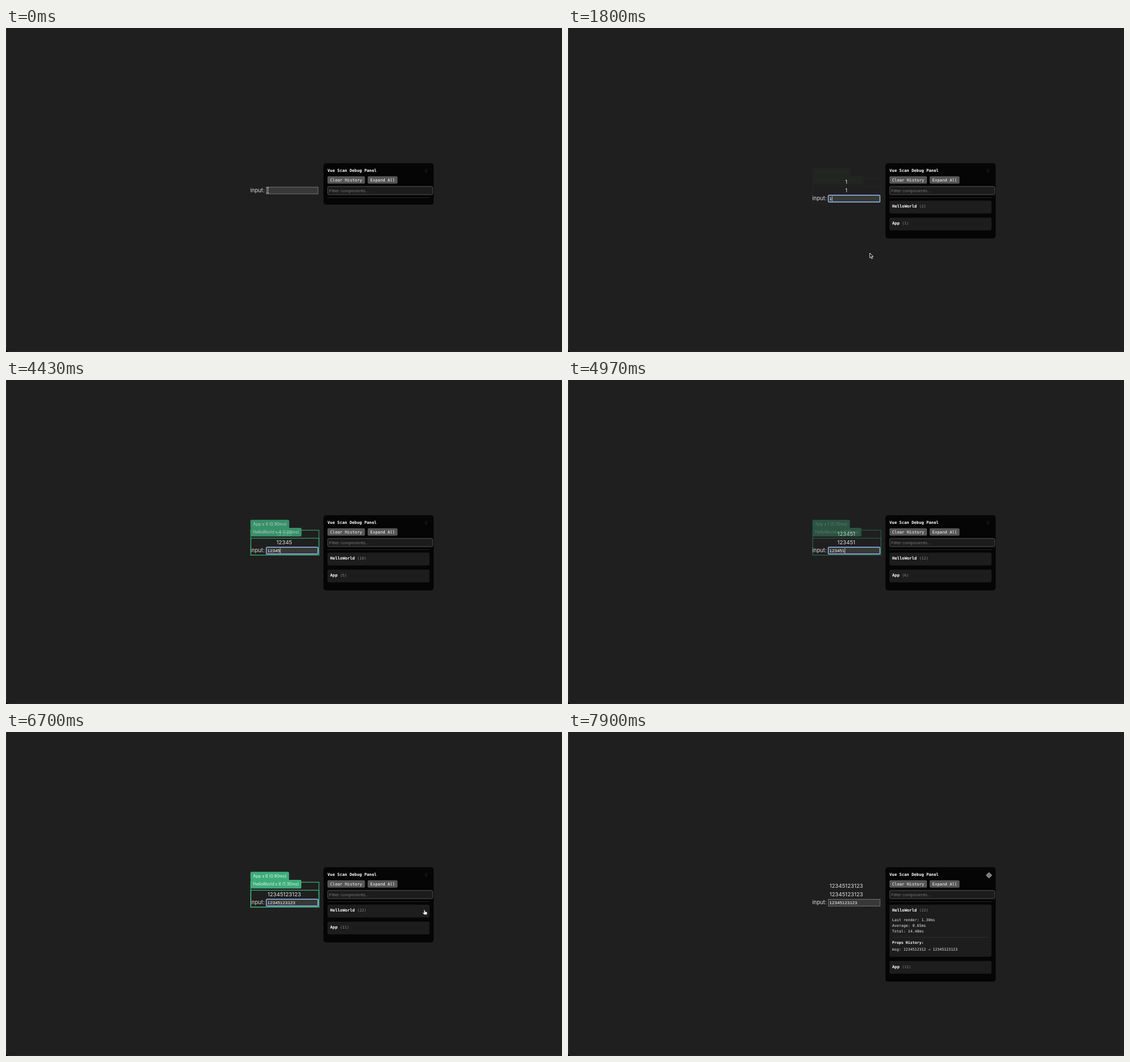
An HTML page for the animation above (8 s loop, 979 px wide and 572 px high).

```html
<!DOCTYPE html>
<html lang="en">
<head>
<meta charset="utf-8">
<title>Debug panel demo</title>
<style>
  html, body { margin: 0; width: 100%; height: 100%; overflow: hidden; background: #000; }
  svg { display: block; width: 100%; height: 100%; }
  text { white-space: pre; fill: #fff; }
  .body { font: 9.6px Inter, sans-serif; fill: #dedede; }
  .tag { font: 7.2px Inter, sans-serif; fill: #e6f5ee; }
  .field { font: 8px "Liberation Sans", sans-serif; }
  .mono { font: 7.2px "DejaVu Sans Mono", monospace; }
  .small { font: 6.6px "DejaVu Sans Mono", monospace; fill: #e8e8e8; }
  .bold { font-weight: bold; fill: #fff; }
  .dim { fill: #8c8c8c; }
</style>
</head>
<body>
<svg id="stage" viewBox="0 0 979 572"></svg>
<script>
const LOOP = 8000;
const FOCUS = 100, CLICK = 6870;
const TYPED = '12345123123';
const KEYS = [570, 1930, 2230, 2930, 3430, 4900, 5130, 5400, 5600, 5730, 5870];

// Bursts of renders: index of the first key, when the labels begin to fade out
const BURSTS = [
  { first: 0, out: 1575 },
  { first: 1, out: 4385 },
  { first: 5, out: 6870 }
];
// App and HelloWorld render times after each key
const APP_MS = [2.2, 0.8, 0.7, 0.9, 0.9, 0.7, 0.6, 0.7, 0.6, 0.7, 0.8];
const HELLO_MS = [3.6, 1.2, 1.1, 1.3, 1, 1.1, 0.9, 1, 0.8, 1, 1.3];

const stage = document.getElementById('stage');

function add(parent, name, attrs = {}, content) {
  const el = document.createElementNS('http://www.w3.org/2000/svg', name);
  set(el, attrs);
  if (content !== undefined) el.textContent = content;
  return parent.appendChild(el);
}
function set(el, attrs) {
  for (const k in attrs) el.setAttribute(k, attrs[k]);
}
function show(el, on) {
  el.style.display = on ? '' : 'none';
}
const group = (parent) => add(parent, 'g');
const rect = (parent, x, y, width, height, attrs) =>
  add(parent, 'rect', { x, y, width, height, ...attrs });
const label = (parent, cls, x, y, content = '') =>
  add(parent, 'text', { class: cls, x, y }, content);
const rule = (parent, x, y, width) =>
  rect(parent, x, y, width, 0.7, { fill: '#343434' });

// CSS "ease" curve
function ease(x) {
  x = Math.min(1, Math.max(0, x));
  let lo = 0, hi = 1;
  for (let i = 0; i < 20; i++) {
    const m = (lo + hi) / 2;
    if (0.75 * m * (1 - m) + m ** 3 < x) lo = m; else hi = m;
  }
  return 0.3 * lo * (1 - lo) ** 2 + 3 * lo * lo * (1 - lo) + lo ** 3;
}

// Window
rect(stage, 0.5, -20, 990, 591.3, { rx: 5, fill: '#1f1f1f', stroke: '#3a3a3a', 'stroke-width': 0.8 });

// Page
const rows = [275, 289.6].map(y => {
  const el = label(stage, 'body', 490, y);
  el.setAttribute('text-anchor', 'middle');
  return el;
});
const form = group(stage);
label(form, 'body', 430, 289.5, 'input:');
const box = rect(form, 458.3, 280.9, 91, 12, { fill: '#383838' });
const value = label(form, 'field', 460.3, 289.8);
const caret = rect(form, 0, 282.6, 0.7, 8.8, { fill: '#fff' });

// Render highlights
const marks = group(stage);
[[265.2, 44], [279.4, 29.8]].forEach(([y, h]) =>
  rect(marks, 431, y, 120, h, { fill: 'none', stroke: '#3fb27f', 'stroke-width': 1.2 }));
const tags = [246.7, 261].map(y => ({
  back: rect(marks, 430.4, y, 60, 15.2, { rx: 2.2, fill: '#3dac7a' }),
  text: label(marks, 'tag', 435.1, y + 10.1)
}));

function setTag(tag, content) {
  if (tag.text.textContent === content) return;
  tag.text.textContent = content;
  tag.back.setAttribute('width', tag.text.getComputedTextLength() + 9.2);
}

// Panel
const panel = rect(stage, 559, 238.8, 194, 73, { rx: 4.5, fill: '#050505' });
label(stage, 'mono bold', 566, 253.8, 'Vue Scan Debug Panel');
[249.7, 252.1, 254.5].forEach(cy => [738.3, 741].forEach(cx =>
  add(stage, 'circle', { cx, cy, r: 0.5, fill: '#555' })));
[[566, 66, 'Clear History'], [636.8, 52.6, 'Expand All']].forEach(([x, w, s]) => {
  rect(stage, x, 261.8, w, 13, { rx: 2, fill: '#565656' });
  label(stage, 'mono', x + 4.8, 270.7, s);
});
rect(stage, 566.4, 279.8, 185, 14.4, { rx: 2, fill: '#1c1c1c', stroke: '#5a5a5a', 'stroke-width': 0.9 });
label(stage, 'field', 569, 289.9, 'Filter components...').style.fill = '#757575';
rule(stage, 566, 299.2, 179.6);

function makeCard(name) {
  const g = group(stage);
  const back = rect(g, 566, 0, 179.7, 22.6, { rx: 2.3, fill: '#1d1d1d' });
  label(g, 'mono bold', 570.8, 12.5, name);
  const count = label(g, 'small dim', 570.8 + 4.334 * (name.length + 1), 12.5);
  return { g, back, count };
}
const hello = makeCard('HelloWorld');
const app = makeCard('App');
hello.g.setAttribute('transform', 'translate(0 304.8)');

const details = group(hello.g);
['Last render: 1.30ms', 'Average: 0.65ms', 'Total: 14.40ms'].forEach((s, i) =>
  label(details, 'small', 570.8, 29.2 + i * 9.9, s));
rule(details, 570.8, 57.2, 170);
label(details, 'small bold', 570.8, 69.2, 'Props History:');
label(details, 'small', 570.8, 81.2, 'msg: 1234512312 → 12345123123');

// Pointers, each drawn around its hot spot
function pointer(d, fill, stroke, width) {
  return add(stage, 'path', { d, fill, stroke, 'stroke-width': width, 'stroke-linejoin': 'round' });
}
const pointers = {
  arrow: pointer('M0 0V8.6L2 6.8L3.4 10L4.9 9.3L3.5 6.2H6.2Z', '#111', '#f2f2f2', 0.9),
  hand: pointer('M-1.8-4.2Q-1-5-.3-4L.6-1.3L3.5-.5Q4.6 0 4.3 1.5L3.6 4.3H-1.1L-3.6 1.2Q-3.9 0-2.8.2L-1.2 1.1Z', '#fff', '#111', 0.6),
  beam: pointer('M-2.2-5Q-.3-5 0-4Q.3-5 2.2-5M0-4V4.2M-2.2 5.2Q-.3 5.2 0 4.2Q.3 5.2 2.2 5.2', 'none', '#d8d8d8', 0.9),
  move: pointer('M0-5L2-2.7H.8V-.8H2.7V-2L5 0L2.7 2V.8H.8V2.7H2L0 5L-2 2.7H-.8V.8H-2.7V2L-5 0L-2.7-2V-.8H-.8V-2.7H-2Z', '#111', '#fff', 0.8)
};

// Pointer moves: [start, end, from, to]; hidden while typing
const MOVES = [
  [0, 1, [461, 286.5], [461, 286.5], KEYS[0]],
  [1400, 1780, [461, 288], [531.3, 397.3], KEYS[1]],
  [6130, 6680, [531.3, 397.3], [737.4, 318.3], 6970],
  [6970, 7770, [737.4, 318.3], [741.3, 253], LOOP]
];

function pointerAt(t) {
  const m = MOVES.find(([start, , , , hide]) => t >= start && t < hide);
  if (!m) return null;
  const [start, end, from, to] = m;
  const p = Math.min(1, (t - start) / (end - start));
  const s = p * p * (3 - 2 * p);
  const [x, y] = from.map((v, i) => v + (to[i] - v) * s);
  return { x, y, kind: pointerKind(t, x, y) };
}
function pointerKind(t, x, y) {
  if (x > 566) {
    if (t >= 7800) return 'move';
    if (y > 280 && y < 294) return 'beam';
    const bottom = t < CLICK ? 357 : 427;
    return y > 305 && y < bottom ? 'hand' : 'arrow';
  }
  return x > 458 && y > 280 && y < 308 && x < 550 ? 'beam' : 'arrow';
}

function draw(t) {
  const n = KEYS.filter(k => k <= t).length;
  const text = TYPED.slice(0, n);
  const focused = t >= FOCUS && t < CLICK;
  const open = t >= CLICK;

  rows.forEach(r => { r.textContent = text; });
  value.textContent = text;
  form.setAttribute('transform', `translate(0 ${n ? 14.4 : 0})`);
  set(box, focused
    ? { stroke: '#94bff3', 'stroke-width': 1.4, rx: 1.4 }
    : { stroke: '#858585', 'stroke-width': 0.8, rx: 0 });
  const since = t - (n ? KEYS[n - 1] : FOCUS);
  show(caret, focused && since % 1000 <= 500);
  caret.setAttribute('x', 460.3 + n * 4.45);

  const burst = BURSTS.filter(b => KEYS[b.first] <= t).pop();
  show(marks, burst);
  if (burst) {
    const fadeIn = ease((t - KEYS[burst.first]) / 300);
    const fadeOut = ease((t - burst.out) / 300);
    marks.setAttribute('opacity', fadeIn * (1 - fadeOut));
    const times = n - burst.first;
    setTag(tags[0], `App x ${times} (${APP_MS[n - 1].toFixed(2)}ms)`);
    setTag(tags[1], `HelloWorld x ${times} (${HELLO_MS[n - 1].toFixed(2)}ms)`);
  }

  panel.setAttribute('height', open ? 202 : n ? 132.6 : 73);
  show(hello.g, n);
  show(app.g, n);
  show(details, open);
  hello.count.textContent = `(${n * 2})`;
  app.count.textContent = `(${n})`;
  hello.back.setAttribute('height', open ? 92 : 22.6);
  app.g.setAttribute('transform', `translate(0 ${open ? 404.2 : 334.7})`);

  const at = pointerAt(t);
  for (const kind in pointers) {
    const on = at && at.kind === kind;
    show(pointers[kind], on);
    if (on) pointers[kind].setAttribute('transform', `translate(${at.x} ${at.y})`);
  }
}

const began = performance.now();
function tick() {
  draw((performance.now() - began) % LOOP);
  requestAnimationFrame(tick);
}
tick();
</script>
</body>
</html>
```
